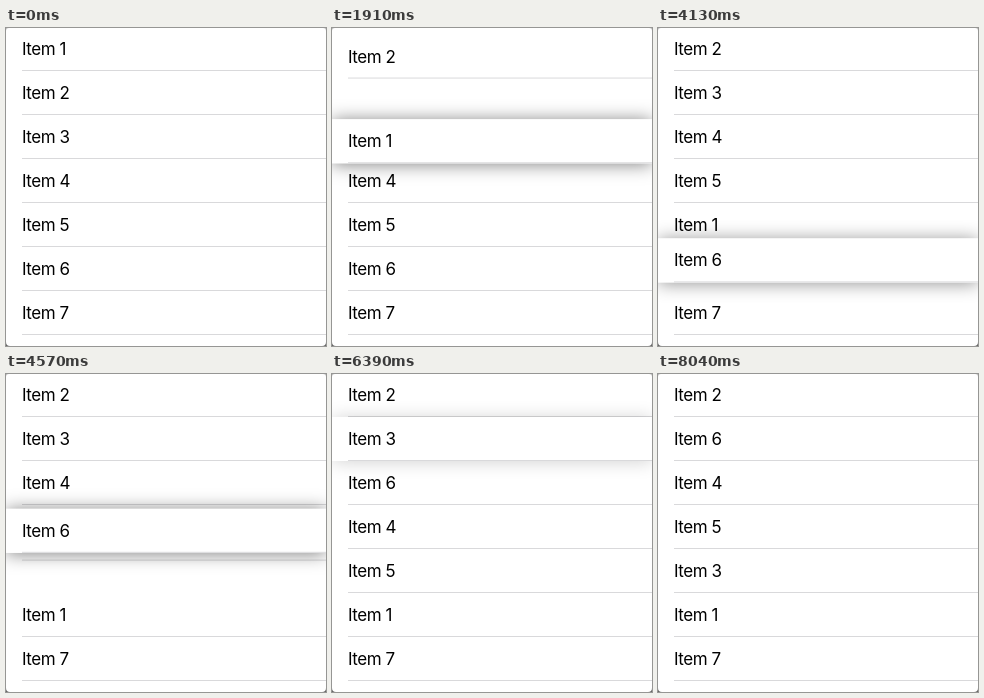
These frames come from a looping animation (320x318 px, 9400 ms). An HTML page with a canvas:

```html
<!DOCTYPE html>
<html lang="en">
<head>
<meta charset="utf-8">
<title>Reorderable list</title>
<style>
  html, body { margin: 0; width: 100%; height: 100%; overflow: hidden; background: #fff; }
  canvas { display: block; width: 320px; height: 318px; }
</style>
</head>
<body>
<canvas id="stage"></canvas>
<script>
const W = 320, H = 318, LOOP = 9400;
const ROW = 44, TOP = -1, SHIFT_MS = 300;

const canvas = document.getElementById('stage');
const ctx = canvas.getContext('2d');
const dpr = window.devicePixelRatio || 1;
canvas.width = W * dpr;
canvas.height = H * dpr;

// path: [time, row top]; swaps: when each passed neighbour starts to slide
const drags = [
  { from: 0, to: 4, lift: 1130, drop: [2530, 2650],
    path: [[1570, -1], [1690, 21], [1830, 65], [1910, 91], [1980, 109], [2180, 153], [2300, 169], [2420, 172]],
    swaps: [1690, 1830, 1980, 2180] },
  { from: 5, to: 2, lift: 3870, drop: [5310, 5520],
    path: [[3960, 219], [4250, 197], [4470, 153], [4570, 135], [4690, 109], [4780, 89], [4900, 74], [5040, 68]],
    swaps: [4250, 4470, 4690] },
  { from: 1, to: 4, lift: 6390, drop: [7830, 8040],
    path: [[6780, 43], [6945, 65], [7110, 109], [7260, 143], [7310, 153], [7400, 167], [7500, 171]],
    swaps: [6945, 7110, 7310] }
];

const clamp = x => Math.max(0, Math.min(1, x));
const ease = x => { x = clamp(x); return x * x * (3 - 2 * x); };
const mix = (a, b, k) => a + (b - a) * k;
const slotTop = slot => TOP + slot * ROW;

// Smooth curve through the points, at rest at both ends
function follow(path, t) {
  const last = path.length - 1;
  if (t <= path[0][0]) return path[0][1];
  if (t >= path[last][0]) return path[last][1];
  const slope = i => i <= 0 || i >= last ? 0 :
    (path[i + 1][1] - path[i - 1][1]) / (path[i + 1][0] - path[i - 1][0]);
  const i = path.findIndex(p => p[0] > t) - 1;
  const [t0, a] = path[i], [t1, b] = path[i + 1];
  const d = t1 - t0, k = (t - t0) / d;
  return mix(a, b, ease(k)) +
    d * k * (1 - k) * ((1 - k) * slope(i) - k * slope(i + 1));
}

function dragTop(drag, t) {
  const [start, end] = drag.drop;
  return mix(follow(drag.path, t), slotTop(drag.to), ease((t - start) / (end - start)));
}

function shadowLevel(drag, t) {
  const [start, end] = drag.drop;
  if (t < drag.lift) return 0;
  const held = t < drag.lift + 90 ? 0.36 : 0.42;
  const grown = mix(held, 1, ease((t - drag.path[0][0]) / 250));
  return grown * (1 - ease((t - start) / (end - start)));
}

function drawRow(item, y) {
  ctx.fillStyle = '#fff';
  ctx.fillRect(0, y, W, ROW);
  ctx.fillStyle = '#d9d9db';
  ctx.fillRect(16, y + ROW - 1, W - 16, 1);
  ctx.fillStyle = '#000';
  ctx.fillText('Item ' + item, 16, y + 28);
}

function drawShadow(y, level) {
  ctx.save();
  ctx.shadowColor = `rgba(0,0,0,${0.5 * level})`;
  ctx.shadowBlur = 18 * dpr;
  ctx.shadowOffsetY = 1 * dpr;
  ctx.fillStyle = '#fff';
  ctx.fillRect(0, y, W, ROW);
  ctx.restore();
}

function drawCorner(x, y, dx, dy, r, color) {
  ctx.fillStyle = color;
  ctx.beginPath();
  ctx.moveTo(x, y);
  ctx.lineTo(x + dx * r, y);
  ctx.quadraticCurveTo(x, y, x, y + dy * r);
  ctx.fill();
}

function draw(t) {
  const order = [1, 2, 3, 4, 5, 6, 7];
  let active = null;
  for (const drag of drags) {
    if (t >= drag.drop[1]) order.splice(drag.to, 0, order.splice(drag.from, 1)[0]);
    else if (t >= drag.lift) active = drag;
  }

  ctx.setTransform(dpr, 0, 0, dpr, 0, 0);
  ctx.fillStyle = '#fff';
  ctx.fillRect(0, 0, W, H);
  ctx.font = '17px Inter, "Open Sans", sans-serif';
  ctx.letterSpacing = '-0.45px';

  const dir = active ? Math.sign(active.to - active.from) : 0;
  order.forEach((item, slot) => {
    if (active && slot === active.from) return;
    const swap = active && active.swaps[(slot - active.from) * dir - 1];
    const shift = swap ? ease((t - swap) / SHIFT_MS) : 0;
    drawRow(item, slotTop(slot) - dir * ROW * shift);
  });

  if (active) {
    const y = dragTop(active, t);
    drawShadow(y, shadowLevel(active, t));
    drawRow(order[active.from], y);
  }

  drawCorner(0, 0, 1, 1, 3, '#bbb');
  drawCorner(W, 0, -1, 1, 3, '#bbb');
  drawCorner(0, H, 1, -1, 4, '#666');
  drawCorner(W, H, -1, -1, 4, '#666');
}

const begin = performance.now();
function tick() {
  draw((performance.now() - begin) % LOOP);
  requestAnimationFrame(tick);
}
tick();
</script>
</body>
</html>
```
